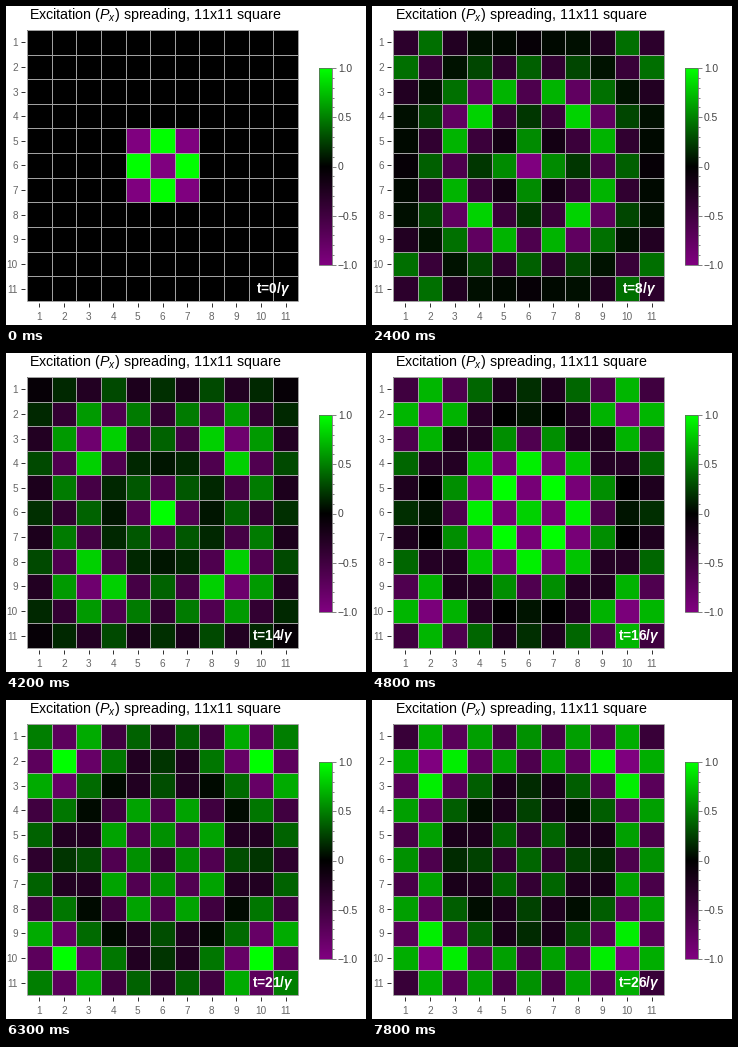
These frames come from a looping animation (360 px wide and 319 px high, 8 s). A matplotlib script:

```python
import numpy as np
import matplotlib.pyplot as plt
from matplotlib.animation import FuncAnimation
from matplotlib.colors import LinearSegmentedColormap
from matplotlib.patches import Rectangle

plt.rcParams.update({
    "font.family": "Liberation Sans",
    "mathtext.fontset": "custom",
    "mathtext.rm": "Liberation Sans",
    "mathtext.it": "Liberation Sans:italic",
    "mathtext.bfit": "Liberation Sans:italic:bold",
})

W, H, DPI = 360, 319, 80
N = 11
LEFT, TOP, SIDE = 21, 23.94, 271
PITCH = SIDE / N
STEPS, INTERVAL, HOLD = 80, 100, 3
LAST_TIME = 26
GRID, INK = "#a0a0a0", "#666666"

CMAP = LinearSegmentedColormap.from_list(
    "excitation", [(0.5, 0, 0.5), (0, 0, 0), (0, 1, 0)], N=512)

# Slow standing waves on the square: (m, n) -> angular frequency in units of gamma
WAVES = {(1, 1): 0.53, (1, 3): 0.61, (3, 3): 0.77, (1, 5): 0.75}
SLOWEST, DAMPING = 0.53, 0.12
FAST_OMEGA, FAST_DECAY = 1.35, 0.25

offset = np.arange(N) - N // 2
stagger = (-1.0) ** offset
block = stagger * (np.abs(offset) <= 1)
start = -np.outer(block, block)


def standing_wave(m, n):
    """Part of the start state carried by the staggered wave (m, n)."""
    a, b = (stagger * np.cos(np.pi * k * offset / (N + 1)) for k in (m, n))
    shape = np.outer(a, b)
    part = np.sum(start * shape) / np.sum(shape ** 2) * shape
    return part if m == n else part + part.T


slow = [(standing_wave(*mode), omega) for mode, omega in WAVES.items()]
fast = start - sum(part for part, _ in slow)


def lattice(t):
    state = np.exp(-FAST_DECAY * t) * np.cos(FAST_OMEGA * t) * fast
    for part, omega in slow:
        fade = np.exp(-DAMPING * (omega - SLOWEST) * t)
        state = state + fade * np.cos(omega * t) * part
    return state / np.abs(state).max()


fig = plt.figure(figsize=(W / DPI, H / DPI), dpi=DPI, facecolor="white")
ax = fig.add_axes([0, 0, 1, 1])
ax.axis("off")


def write(x, y, text, px, **style):
    return ax.text(x, y, text, fontsize=px * 72 / DPI, **style)


def stroke(xs, ys, color, px=1):
    ax.plot(xs, ys, color=color, lw=px * 72 / DPI, solid_capstyle="butt", snap=True)


cells = ax.imshow(lattice(0), cmap=CMAP, vmin=-1, vmax=1, interpolation="nearest",
                  extent=(LEFT, LEFT + SIDE, TOP + SIDE, TOP), aspect="auto")

for i in range(N + 1):
    x, y = LEFT + i * PITCH, TOP + i * PITCH
    stroke([x, x], [TOP, TOP + SIDE], GRID)
    stroke([LEFT, LEFT + SIDE], [y, y], GRID)

for i in range(N):
    x, y = LEFT + (i + 0.5) * PITCH, TOP + (i + 0.5) * PITCH
    stroke([15, 19], [y, y], "#333333")
    stroke([x, x], [297, 301], "#333333")
    write(12, y, str(i + 1), 10, color=INK, ha="right", va="center_baseline")
    write(x, 310, str(i + 1), 10, color=INK, ha="center", va="center_baseline")

# Colour legend
BAR_L, BAR_R, BAR_T, BAR_B = 313, 326, 62, 259
ax.imshow(np.linspace(1, -1, BAR_B - BAR_T)[:, None], cmap=CMAP, vmin=-1, vmax=1,
          extent=(BAR_L, BAR_R, BAR_B, BAR_T), aspect="auto")
ax.add_patch(Rectangle((BAR_L, BAR_T), BAR_R - BAR_L, BAR_B - BAR_T,
                       fill=False, ec=INK, lw=0.7, snap=True))
for i in range(21):
    y = BAR_T + (BAR_B - BAR_T) * i / 20
    major = i % 5 == 0
    stroke([BAR_R, BAR_R + (4 if major else 2)], [y, y], INK, 0.8)
    if major:
        label = "0" if i == 10 else f"{1 - i / 10:.1f}".replace("-", "\u2212")
        write(332, y, label, 10.3, color="#444444", va="center_baseline")

write(23, 13, "Excitation ($P_x$) spreading, 11x11 square", 14.3,
      color="black", va="baseline")
clock = write(267, 287, "", 13.8, color="white", weight="bold",
              ha="center", va="baseline")

ax.set_xlim(0, W)
ax.set_ylim(H, 0)


def update(step):
    t = min(step // HOLD, LAST_TIME)
    cells.set_data(lattice(t))
    clock.set_text(rf"t={t}/$\mathbfit{{\gamma}}$")
    return cells, clock


animation = FuncAnimation(fig, update, frames=STEPS, interval=INTERVAL,
                          repeat=True, repeat_delay=0)
plt.show()
```
